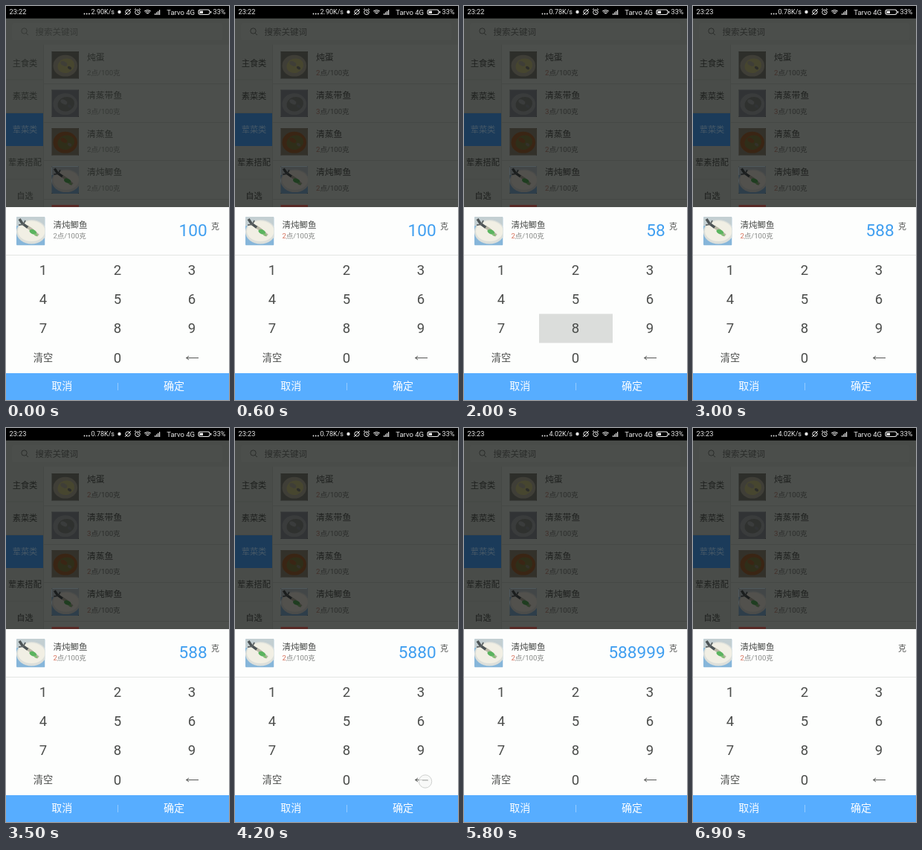
An HTML page with a canvas that plays this animation: 300 px wide and 529 px high, repeating every 7000 ms.

```html
<!DOCTYPE html>
<html lang="zh">
<head>
<meta charset="utf-8">
<style>
html, body { margin: 0; width: 100%; height: 100%; overflow: hidden; background: #000; }
canvas { display: block; width: 300px; height: 529px; }
</style>
</head>
<body>
<canvas id="stage"></canvas>
<script>
const LOOP = 7000, STEP = 100;
const canvas = document.getElementById('stage');
const ratio = window.devicePixelRatio || 1;
canvas.width = 300 * ratio;
canvas.height = 529 * ratio;
const ctx = canvas.getContext('2d');
ctx.scale(ratio, ratio);

const FONT = 'Roboto, "Noto Sans CJK SC", "Noto Sans CJK", sans-serif';
const values = [[0, '100'], [1300, '5'], [2000, '58'], [2600, '588'], [3600, '5880'],
  [4300, '588'], [4700, '5889'], [5100, '58899'], [5500, '588999'], [6600, '']];
const speeds = [[0, '2.90'], [1200, '0.78'], [5100, '4.02']];
const clocks = [[0, '23:22'], [2200, '23:23']];
// start time, column, row
const presses = [[1300, 1, 1], [2000, 1, 2], [2600, 1, 2], [3600, 1, 3],
  [4700, 2, 2], [5100, 2, 2], [5500, 2, 2], [6500, 0, 3]];
const HOLD = 200;
const keys = ['1', '2', '3', '4', '5', '6', '7', '8', '9', '清空', '0', ''];
const dishes = [
  { name: '炖蛋', points: '2', bg: '#85867c', plate: '#b8b7a2', food: '#d2cd8a' },
  { name: '清蒸带鱼', points: '3', bg: '#8f969c', plate: '#abb0b0', food: '#8a9089' },
  { name: '清蒸鱼', points: '2', bg: '#96907c', plate: '#ac6c3c', food: '#8b874b' },
  { name: '清炖鲫鱼', points: '2', fish: true }
];

const at = (list, t) => list.filter(([start]) => start <= t).pop()[1];

function rect(x, y, w, h, color) {
  ctx.fillStyle = color;
  ctx.fillRect(x, y, w, h);
}

function oval(x, y, rx, ry, color, angle = 0) {
  ctx.fillStyle = color;
  ctx.beginPath();
  ctx.ellipse(x, y, rx, ry, angle, 0, Math.PI * 2);
  ctx.fill();
}

function line(points, color, width = 1) {
  ctx.strokeStyle = color;
  ctx.lineWidth = width;
  ctx.beginPath();
  points.forEach(([x, y]) => ctx.lineTo(x, y));
  ctx.stroke();
}

function arc(x, y, r, color, from = 0, to = Math.PI * 2, width = 1) {
  ctx.strokeStyle = color;
  ctx.lineWidth = width;
  ctx.beginPath();
  ctx.arc(x, y, r, from, to);
  ctx.stroke();
}

// y is the visual middle of the glyphs
function text(str, x, y, size, color, align = 'left') {
  ctx.font = `${size}px ${FONT}`;
  ctx.textAlign = align;
  ctx.fillStyle = color;
  ctx.fillText(str, x, y + size * 0.37);
}

function portion(points, x, y, size, accent, color) {
  text(points, x, y, size, accent);
  text('点/100克', x + ctx.measureText(points).width, y, size, color);
}

function thumbnail(dish, x, y, size) {
  ctx.save();
  ctx.translate(x, y);
  ctx.scale(size / 38, size / 38);
  ctx.beginPath();
  ctx.roundRect(0, 0, 38, 38, 1.5);
  ctx.clip();
  if (dish.fish) {
    rect(0, 0, 38, 38, '#86b6da');
    rect(0, 0, 38, 12, '#c3cfd2');
    oval(20, 20, 20, 16, '#dcdfda');
    oval(20, 19, 18, 13.5, '#f1efe4');
    line([[14, 13], [20, 17], [29, 25]], '#b9b7a6', 4);
    line([[4, 3], [8, 9], [15, 14]], '#4d5456', 3.5);
    line([[3, 11], [9, 10], [12, 5]], '#5d6466', 1.8);
    oval(22, 20, 5, 3, '#5bb45f', 0.4);
    oval(26, 24, 2.5, 1.6, '#86bd77', 0.3);
  } else {
    rect(0, 0, 38, 38, dish.bg);
    oval(19, 20, 17, 15, dish.plate);
    oval(20, 20, 12, 10, dish.food, -0.3);
    oval(17, 17, 5, 3, dish.plate, 0.5);
    oval(25, 23, 3, 2, dish.bg, 0.6);
  }
  ctx.restore();
}

function statusBar(t) {
  rect(0, 0, 300, 16.7, '#000');
  const white = '#e9e9e9';
  text(at(clocks, t), 4.5, 8, 9.2, white);
  for (let i = 0; i < 3; i++) oval(105.5 + i * 3.2, 10.5, 0.9, 0.9, white);
  text(at(speeds, t) + 'K/s', 146, 8, 9, white, 'right');
  oval(152.5, 8, 2.2, 2.2, white);
  arc(164, 8, 3.2, white);
  line([[160, 12], [168, 4]], white);
  arc(177, 8.3, 3.3, white);
  line([[177, 6], [177, 8.5], [179, 9]], white, 0.8);
  line([[173, 5], [175, 3.5]], white);
  line([[179, 3.5], [181, 5]], white);
  for (let i = 1; i < 4; i++) arc(190.5, 11.5, i * 2, white, -2.35, -0.8, 1.1);
  for (let i = 0; i < 4; i++) rect(200 + i * 2, 10 - i * 1.6, 1.2, 2 + i * 1.6, white);
  text('Tarvo 4G', 254, 8, 9.5, white, 'right');
  ctx.strokeStyle = white;
  ctx.beginPath();
  ctx.roundRect(259, 5, 15, 6.5, 2.5);
  ctx.stroke();
  rect(260.5, 6.5, 4.5, 3.5, white);
  rect(275, 7, 1.3, 2.5, white);
  text('33%', 295.5, 8, 9.1, white, 'right');
}

function page(t) {
  const settled = t >= 300;
  const ink = settled ? '#1f211f' : '#292c29';
  const faint = settled ? '#2b2d2b' : '#363936';
  const rule = '#454845';
  rect(0, 16, 300, 254, '#4c4f4c');
  rect(0, 16, 300, 36, '#494c49');
  ctx.fillStyle = '#4b4e4b';
  ctx.beginPath();
  ctx.roundRect(8, 23, 283, 23, 3);
  ctx.fill();
  arc(24.5, 33.5, 3.7, faint);
  line([[27, 36.5], [30, 39]], faint);
  text('搜索关键词', 39.5, 34.5, 11.5, faint);

  rect(0, 52, 50, 218, '#494c49');
  ['主食类', '素菜类', '荤菜类', '荤素搭配', '自选'].forEach((label, i) => {
    const y = 76.5 + i * 44.5;
    if (i === 2) rect(0, 144, 50, 44, '#1b3b5a');
    else rect(0, y + 22, 50, 1, rule);
    text(label, 25.5, y, 11.2, i === 2 ? '#465867' : ink, 'center');
  });
  rect(50, 52, 1, 218, rule);

  dishes.forEach((dish, i) => {
    const y = 61 + i * 51.5;
    thumbnail(dish, 61.5, y, 36.5);
    rect(61.5, y, 36.5, 36.5, 'rgba(0,0,0,.66)');
    text(dish.name, 109, y + 7.5, 11.8, ink);
    portion(dish.points, 109, y + 28.5, 9.6, settled ? '#42302b' : faint, faint);
    rect(51, Math.round(y + 43), 249, 1, rule);
  });
  rect(61.5, 267, 36.5, 3, '#582a26');
}

function keypad(t) {
  for (const [start, col, row] of presses) {
    if (t >= start && t < start + HOLD) rect(col * 100 + 1, 374 + (row - 1) * 39.4, 99, 39, '#dbdddb');
  }
  keys.forEach((key, i) => {
    const x = 50 + (i % 3) * 100, y = 354.2 + Math.floor(i / 3) * 39.2;
    text(key, x, y, i === 9 ? 13.2 : 18.5, '#4b4d4b', 'center');
  });
  line([[242.5, 472.5], [259, 472.5]], '#555755');
  line([[246, 470], [242.5, 472.5], [246, 475]], '#555755');
  if (t >= 4100 && t < 4300) {
    oval(256, 474.5, 8.5, 8.5, 'rgba(245,247,245,.75)');
    arc(256, 474.5, 8.7, '#c9cbc9', 0, Math.PI * 2, 0.9);
    line([[252, 473], [260, 473]], '#a7a9a7');
  }
}

function panel(t) {
  rect(0, 270, 300, 223, '#fdfefd');
  thumbnail(dishes[3], 14, 283, 38.5);
  text('清炖鲫鱼', 63.4, 294, 11.5, '#4b4d4b');
  portion('2', 63.5, 308.2, 9.5, t < 300 ? '#8d8f8d' : '#d5705a', '#858785');
  text(at(values, t), 270.6, 300.7, 22.6, '#409ff0', 'right');
  text('克', 276, 296, 11, '#555755');
  rect(0, 334, 300, 1, '#e4e6e4');
  keypad(t);
  rect(0, 493, 300, 36, '#57adff');
  text('取消', 75.3, 509.7, 14, '#fff', 'center');
  text('确定', 226, 509.7, 14, '#fff', 'center');
  rect(150, 506, 1, 10, '#94cbff');
}

const begin = performance.now();
function frame(now) {
  const t = Math.floor((Math.max(0, now - begin) % LOOP) / STEP) * STEP;
  page(t);
  statusBar(t);
  panel(t);
  requestAnimationFrame(frame);
}
frame(begin);
</script>
</body>
</html>
```
